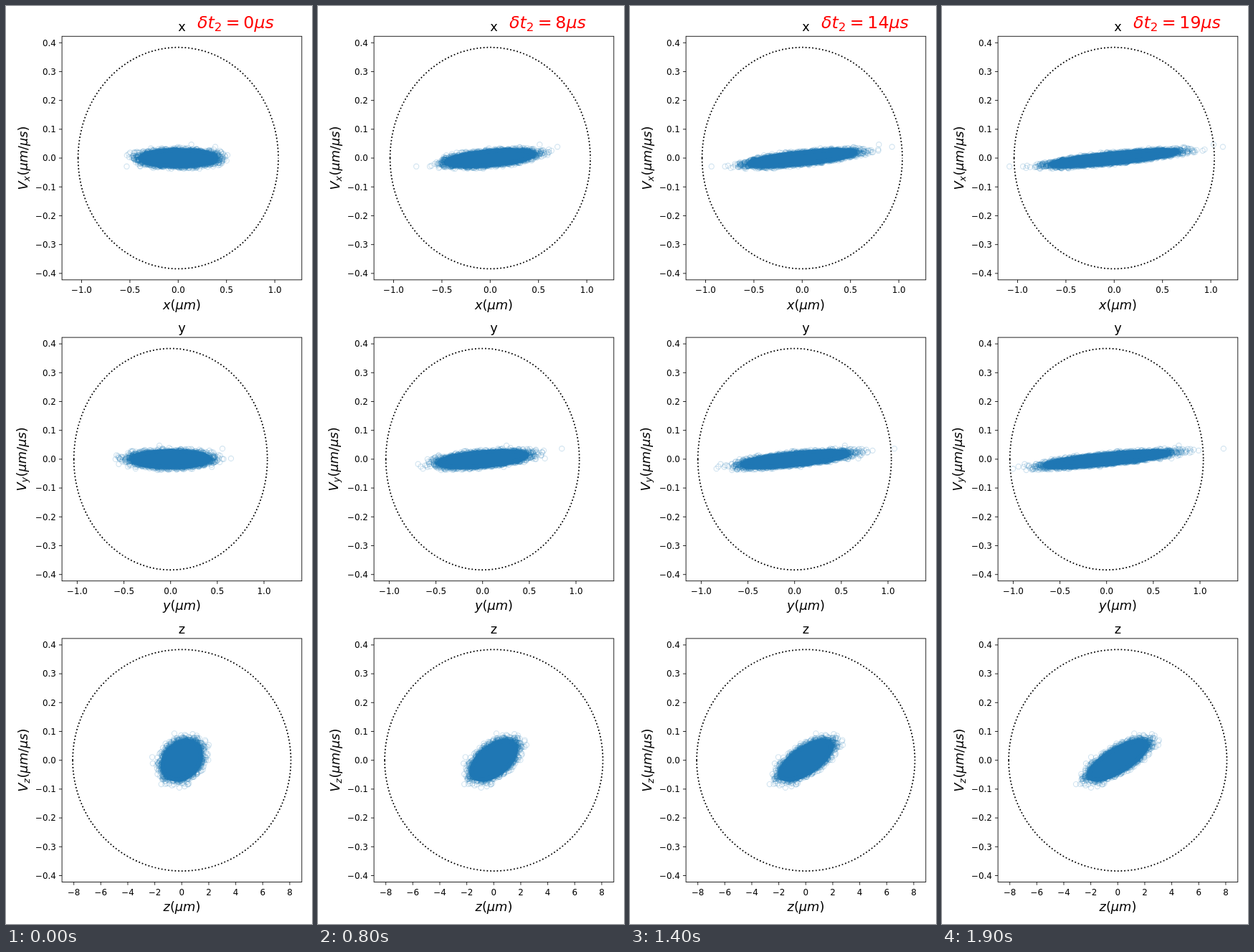
Animation, 427 px wide and 1280 px high, one loop 2 s. Source, as an HTML page with a canvas:

```html
<!DOCTYPE html>
<html lang="en">
<head>
<meta charset="utf-8">
<title>Phase space expansion</title>
<style>
  html, body { margin: 0; width: 100%; height: 100%; overflow: hidden; background: #fff; }
  canvas { display: block; width: 427px; height: 1280px; }
</style>
</head>
<body>
<canvas id="stage"></canvas>
<script>
const W = 427, H = 1280;
const PT = 1.185;                       // pixels per typographic point
const LEFT = 78.1, RIGHT = 412.8, HALF = 169.8;
const RY = HALF / 1.1, V_SCALE = RY / 0.384;
const STEP_MS = 100, STEPS = 20;
const BLUE = '#1f77b4';
const INNER = 2.4, OUTER = 3.8, CORE = 2.6, COUNT = 16000;

// sx, sv: spreads of position and velocity; rho: their correlation
const panels = [
  { name: 'x', cy: 212.05, cx: 240.3, scale: 134.8, rx: 139.7, labelX: 30, digits: 1,
    ticks: [-1, -0.5, 0, 0.5, 1], sx: 0.15, sv: 0.0105, rho: 0,
    strays: [[-0.533, -0.029], [0.384, 0.039], [0.136, 0.047], [-0.393, -0.029]] },
  { name: 'y', cy: 631.9, cx: 229.7, scale: 130.3, rx: 135, labelX: 27.5, digits: 1,
    ticks: [-1, -0.5, 0, 0.5, 1], sx: 0.158, sv: 0.0105, rho: 0,
    strays: [[0.555, 0.0367], [0.647, 0.0025], [-0.58, 0.0137], [-0.59, 0],
             [-0.555, -0.017], [-0.12, 0.047], [-0.375, -0.033], [0.415, 0.03]] },
  { name: 'z', cy: 1051.7, cx: 245.3, scale: 18.83, rx: 152.2, labelX: 30, digits: 0,
    ticks: [-8, -6, -4, -2, 0, 2, 4, 6, 8], sx: 0.54, sv: 0.0255, rho: 0.25,
    strays: [[-2.19, 0.011], [-2.15, -0.011], [-0.55, 0.093], [-0.18, -0.095],
             [-1.52, -0.083], [-1.8, -0.048], [1.73, 0.07], [2, 0.053], [0.33, 0.085]] }
];

const canvas = document.getElementById('stage');
const ratio = window.devicePixelRatio || 1;
canvas.width = W * ratio;
canvas.height = H * ratio;
const ctx = canvas.getContext('2d');
ctx.scale(ratio, ratio);

function seeded(seed) {
  return () => {
    seed = (seed + 0x6d2b79f5) | 0;
    let n = Math.imul(seed ^ (seed >>> 15), 1 | seed);
    n = (n + Math.imul(n ^ (n >>> 7), 61 | n)) ^ n;
    return ((n ^ (n >>> 14)) >>> 0) / 4294967296;
  };
}

// Maps polar coordinates of a unit normal cloud to [position, velocity]
function toPhase(p, r, angle) {
  const a = r * Math.cos(angle), b = r * Math.sin(angle);
  return [p.sx * a, p.sv * (p.rho * a + Math.sqrt(1 - p.rho ** 2) * b)];
}

// Only the rim of the cloud is sampled; its dense middle is a solid fill
function makeRim(p, index) {
  const random = seeded(17 + index * 101);
  const near = Math.exp(-(INNER ** 2) / 2), far = Math.exp(-(OUTER ** 2) / 2);
  const points = Array.from({ length: Math.round(COUNT * near) }, () => {
    const r = Math.sqrt(-2 * Math.log(far + (near - far) * random()));
    return toPhase(p, r, 2 * Math.PI * random());
  });
  return points.concat(p.strays);
}
panels.forEach((p, i) => { p.points = makeRim(p, i); });

function place(p, [x, v], t) {
  return [p.cx + (x + v * t) * p.scale, p.cy - v * V_SCALE];
}

function drawCloud(p, t) {
  ctx.strokeStyle = 'rgba(31, 119, 180, 0.2)';
  ctx.lineWidth = PT;
  for (const point of p.points) {
    ctx.beginPath();
    ctx.arc(...place(p, point, t), 3 * PT, 0, 2 * Math.PI);
    ctx.stroke();
  }

  ctx.fillStyle = ctx.strokeStyle = BLUE;
  ctx.lineWidth = 5 * PT;
  ctx.beginPath();
  for (let i = 0; i < 90; i++) {
    ctx.lineTo(...place(p, toPhase(p, CORE, i * Math.PI / 45), t));
  }
  ctx.closePath();
  ctx.fill();
  ctx.stroke();
}

function drawBoundary(p) {
  ctx.strokeStyle = '#000';
  ctx.lineWidth = 1.5 * PT;
  ctx.setLineDash([1.5 * PT, 2.475 * PT]);
  for (const below of [false, true]) {
    ctx.beginPath();
    ctx.ellipse(p.cx, p.cy, p.rx, RY, 0, Math.PI, below ? 0 : 2 * Math.PI, below);
    ctx.stroke();
  }
  ctx.setLineDash([]);
}

function setFont(size, italic) {
  ctx.font = `${italic ? 'italic ' : ''}${size}px "DejaVu Sans", sans-serif`;
}

function text(s, x, y, size, align) {
  setFont(size, false);
  ctx.textAlign = align;
  ctx.fillText(s, x, y);
}

// Runs: '_' lowers a subscript, letters are slanted, '=' gets space around it
function formula(source, x, y, size, centred) {
  const runs = source.match(/_.|[a-zA-Zδμ]+|=|[^a-zA-Zδμ_=]+/g).map(part => {
    const sub = part[0] === '_', s = sub ? part[1] : part;
    const italic = /[a-zA-Zδμ]/.test(s);
    const fontSize = sub ? size * 0.7 : size;
    const pad = s === '=' ? size * 0.2 : 0;
    setFont(fontSize, italic);
    const width = ctx.measureText(s).width + 2 * pad + (sub ? size * 0.03 : 0);
    return { s, italic, fontSize, pad, width, drop: sub ? size * 0.16 : 0 };
  });
  if (centred) x -= runs.reduce((sum, run) => sum + run.width, 0) / 2;
  ctx.textAlign = 'left';
  for (const run of runs) {
    setFont(run.fontSize, run.italic);
    ctx.fillText(run.s, x + run.pad, y + run.drop);
    x += run.width;
  }
}

const number = (n, digits) => n.toFixed(digits).replace('-', '−');

function drawAxes(p) {
  const top = p.cy - HALF, bottom = p.cy + HALF, middle = (LEFT + RIGHT) / 2;
  const small = 10 * PT, large = 15 * PT, tick = 3.5 * PT;
  ctx.strokeStyle = ctx.fillStyle = '#000';
  ctx.lineWidth = 0.72 * PT;
  ctx.strokeRect(LEFT, top, RIGHT - LEFT, 2 * HALF);
  ctx.beginPath();
  for (const value of p.ticks) {
    const x = p.cx + value * p.scale;
    ctx.moveTo(x, bottom);
    ctx.lineTo(x, bottom + tick);
    text(number(value, p.digits), x, bottom + 18.2, small, 'center');
  }
  for (let i = -4; i <= 4; i++) {
    const y = p.cy - i / 10 * V_SCALE;
    ctx.moveTo(LEFT, y);
    ctx.lineTo(LEFT - tick, y);
    text(number(i / 10, 1), LEFT - 2 * tick, y + 4.3, small, 'right');
  }
  ctx.stroke();

  text(p.name, middle, top - 6 * PT, large, 'center');
  formula(`${p.name}(μm)`, middle, bottom + 40.7, large, true);
  ctx.save();
  ctx.translate(p.labelX, p.cy);
  ctx.rotate(-Math.PI / 2);
  formula(`V_${p.name}(μm/μs)`, 0, 0, large, true);
  ctx.restore();
}

function draw(t) {
  ctx.fillStyle = '#fff';
  ctx.fillRect(0, 0, W, H);
  for (const p of panels) {
    drawCloud(p, t);
    drawBoundary(p);
    drawAxes(p);
  }
  ctx.fillStyle = '#f00';
  formula(`δt_2=${t}μs`, 267, 30.8, 20 * PT, false);
}

let start = null, shown = -1;
function tick(now) {
  if (start === null) start = now;
  const step = Math.floor((now - start) / STEP_MS) % STEPS;
  if (step !== shown) draw(shown = step);
  requestAnimationFrame(tick);
}
draw(shown = 0);
requestAnimationFrame(tick);
</script>
</body>
</html>
```
